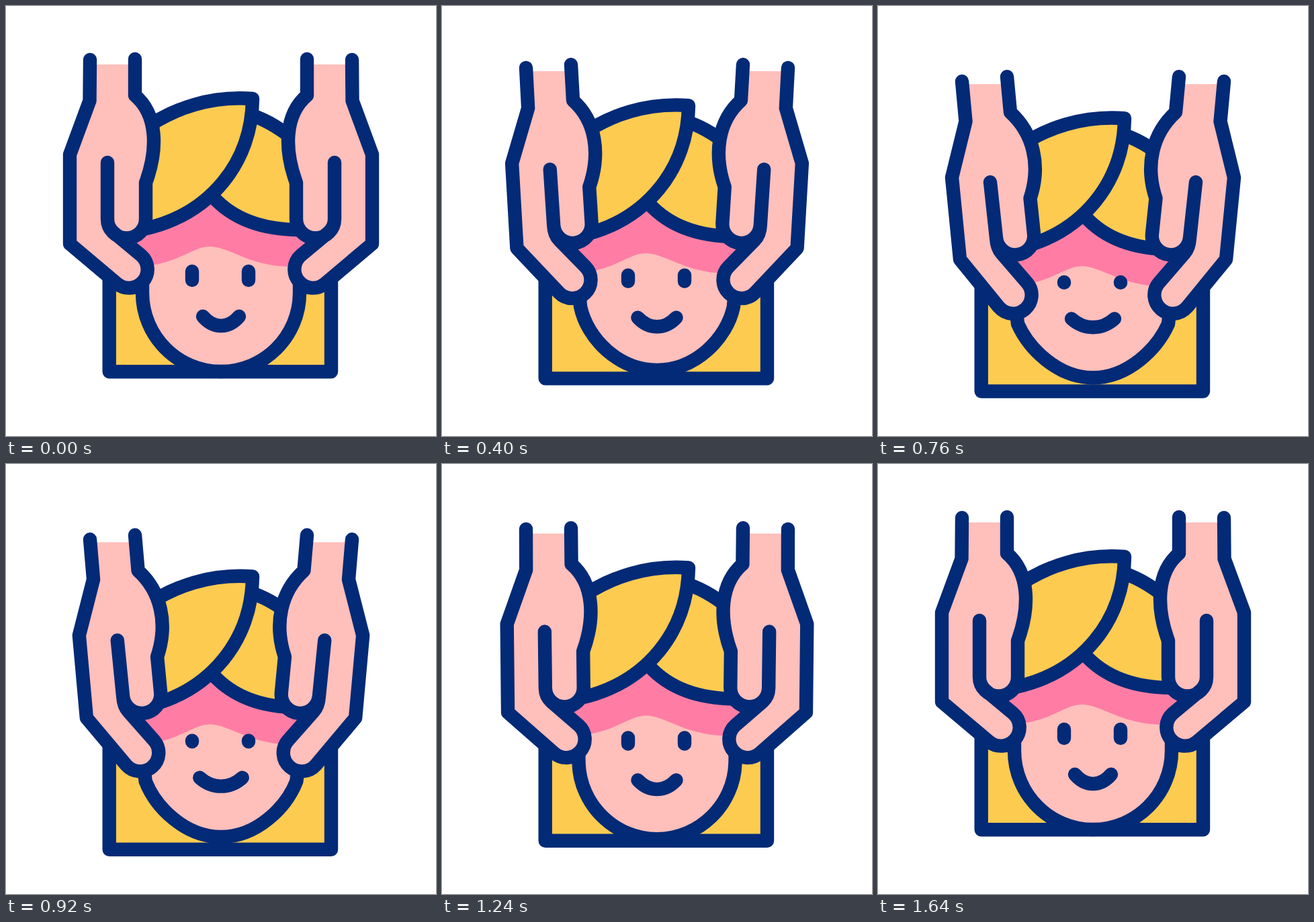
Recreate the animation shown at these times as an HTML page. Size 640 by 640 pixels, loop 1.76 s.

```html
<!DOCTYPE html>
<html lang="en">
<head>
<meta charset="utf-8">
<title>Head massage</title>
<style>
  html, body { margin: 0; height: 100%; overflow: hidden; background: #fff; }
  svg { display: block; width: 100%; height: 100%; }
  .line { stroke: #032a76; stroke-width: 20.4; stroke-linejoin: round; }
  .round { stroke-linecap: round; }
  .none { fill: none; }
  .skin { fill: #ffbfbb; }
  .hair { fill: #fdcb50; }
  .band { fill: #ff7da4; }
</style>
</head>
<body>
<svg viewBox="0 0 640 640">
  <clipPath id="cuff"><path d="M0 87H640V640H0Z"/></clipPath>
  <g id="scene">
    <path class="line hair" d="M153.700 386V544.300H484V386"/>
    <path class="skin" d="M203 320H437V410H203Z"/>
    <path class="line skin" id="face"/>
    <path class="band" d="M190 340L304 287 450 335V388H420C360 386 332 358 303 358C280 358 262 379 215 386L190 388Z"/>
    <path class="hair" d="M367 163Q400 174 437 206V333C378 333 337 316 308 284Z"/>
    <path class="line none" d="M367 163Q400 174 437 206M437 333C378 333 337 316 308 284"/>
    <path class="line hair" d="M200 187C250 150 308 133.500 367 138C366 232 305 310 205 332"/>
    <path class="line round none" id="eyes"/>
    <path class="line round none" id="mouth"/>
    <g id="hand">
      <path class="skin" id="palm" clip-path="url(#cuff)"/>
      <path class="line round none" id="outline"/>
    </g>
    <use href="#hand" transform="translate(640) scale(-1 1)"/>
  </g>
</svg>
<script>
const LOOP = 1760;
const DROP = 29.5;

// Each shape is a pair of matching paths: relaxed and pressed.
const shapes = {
  face: [
    'M203 400L203 427C203 491.5 255.5 544 320 544C384.5 544 437 491.5 437 427L437 400',
    'M203 400L208 444C224 480 267 524 320 524C373 524 416 480 432 444L437 400'
  ],
  eyes: [
    'M277 395L277 408M361 395L361 408',
    'M277 381.7L277 382.7M361 381.7L361 382.7'
  ],
  mouth: [
    'M293 462C309 480.7 331 480.7 347 462',
    'M288 436.3C307 453.3 333 453.3 352 436.3'
  ],
  thumb: [
    'M125 80L124.5 141L95 221L95 354L165 413A1 1 0 0 0 201 371L160 337Q151 329 151 317',
    'M125 83L130.5 142.5L110 226L122 348L180 419A1 1 0 0 0 222 383L184 339Q177 331 176 316'
  ],
  crease: ['L151 233', 'L167 233'],
  fingerStart: ['M151 317', 'M176 316'],
  finger: [
    'A1 1 0 0 0 208 317L208 263C226 214 226 162 192 133L192 79',
    'A1 1 0 0 0 232 310L226.5 257C243 207 231 160 197 129L192 76'
  ]
};

const numbers = /[\d.]+/g;

function morph(name, amount) {
  const [from, to] = shapes[name];
  const goals = to.match(numbers);
  let i = 0;
  return from.replace(numbers, n => +n + (goals[i++] - n) * amount);
}

function ease(p) {
  p = Math.min(1, Math.max(0, p));
  const a = p ** 1.72, b = (1 - p) ** 1.72;
  return a / (a + b);
}

const pulse = (t, inStart, inEnd, outStart, outEnd) =>
  ease((t - inStart) / (inEnd - inStart)) - ease((t - outStart) / (outEnd - outStart));

const setPath = (id, d) => document.getElementById(id).setAttribute('d', d);

function draw(now) {
  const t = now % LOOP;
  const drop = DROP * pulse(t, 125, 805, 920, 1610);
  const press = pulse(t, 60, 665, 815, 1370);
  const squint = pulse(t, 180, 738, 830, 1500);

  document.getElementById('scene').setAttribute('transform', `translate(0 ${drop})`);
  setPath('face', morph('face', press));
  setPath('eyes', morph('eyes', squint));
  setPath('mouth', morph('mouth', squint));

  const thumb = morph('thumb', press), finger = morph('finger', press);
  setPath('palm', thumb + finger);
  setPath('outline', thumb + morph('crease', press) + morph('fingerStart', press) + finger);
  requestAnimationFrame(draw);
}
draw(performance.now());
</script>
</body>
</html>
```
